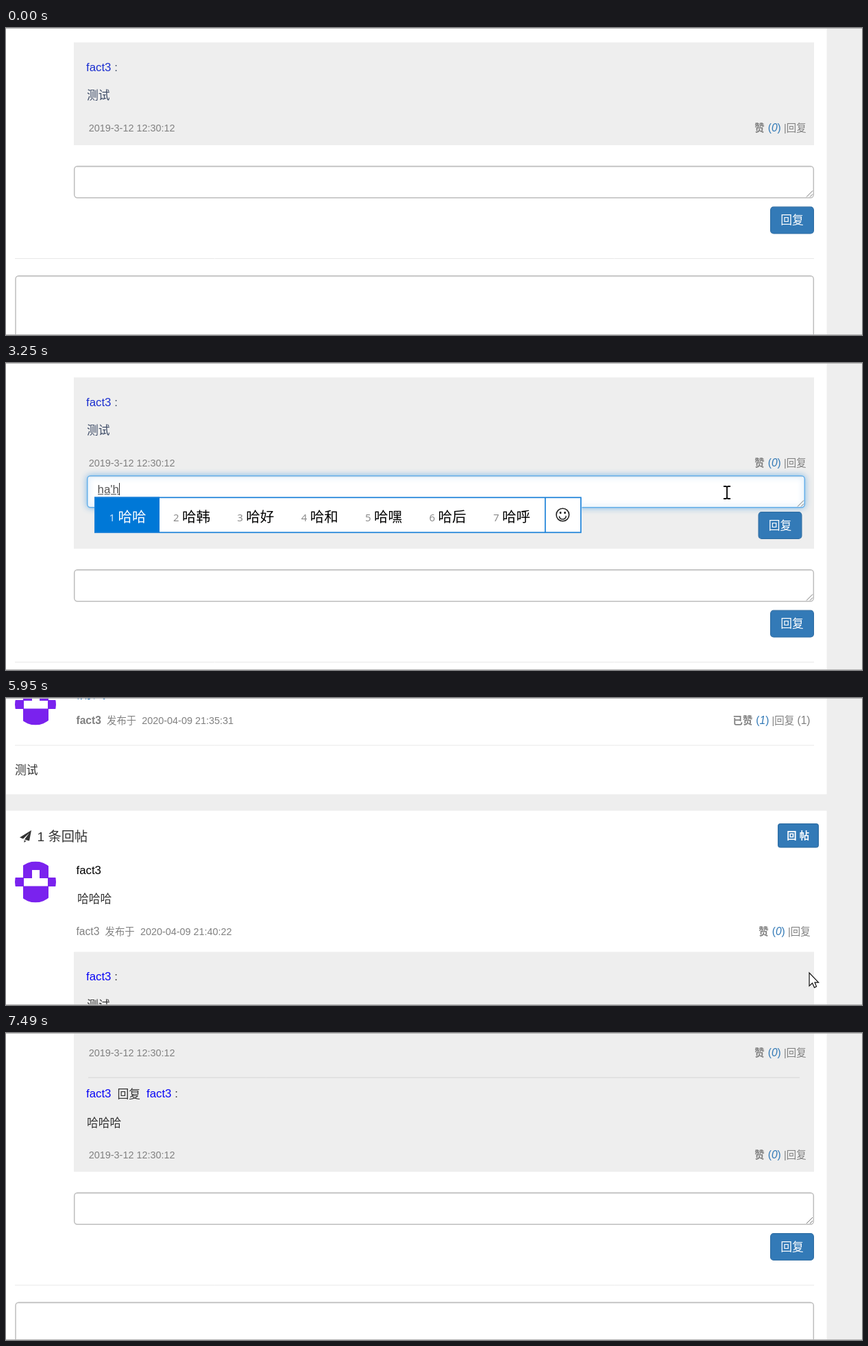
Animation, 1249 px wide and 448 px high, one loop 7870 ms. Source, as an HTML page with a canvas:

```html
<!DOCTYPE html>
<html lang="zh-CN">
<head>
<meta charset="utf-8">
<title>回复演示</title>
<style>
html, body { margin: 0; width: 100%; height: 100%; overflow: hidden; background: #eee; }
canvas { display: block; }
</style>
</head>
<body>
<canvas id="stage" width="1249" height="448"></canvas>
<script>
const c = document.getElementById('stage').getContext('2d');
const LOOP = 7870, RELOAD = 5170, USER = 'fact3';
const SANS = '"Liberation Sans", "Noto Sans CJK SC", "Noto Sans CJK", sans-serif';
const UI = '"Open Sans", "Noto Sans CJK SC", "Noto Sans CJK", sans-serif';
const GREY = '#808080', BLUE = '#337ab7';

// Piecewise linear track: keys are [time, ...values]
function track(t, keys) {
  let i = 1;
  while (i < keys.length - 1 && t > keys[i][0]) i++;
  const a = keys[i - 1], b = keys[i];
  const p = Math.min(1, Math.max(0, (t - a[0]) / (b[0] - a[0])));
  return a.slice(1).map((v, k) => v + (b[k + 1] - v) * p);
}
const within = (t, a, b) => t >= a && t < b;
const swing = p => 0.5 - Math.cos(Math.PI * Math.min(1, Math.max(0, p))) / 2;

const POINTER = [
  [0, 1204, 470], [55, 1204, 455], [110, 1202, 425], [350, 1180, 270], [640, 1150, 160],
  [720, 1148, 152], [1220, 1148, 152], [1500, 1075, 184], [1690, 1052, 189],
  [4380, 1052, 189], [4560, 1132, 239], [4740, 1132, 239], [5110, 1160, 308],
  [5400, 1162, 330], [5950, 1172, 401], [6180, 1186, 421], [6260, 1190, 425],
  [6420, 1197, 460], [6740, 1203, 460], [6800, 1200, 432], [7030, 1167, 371],
  [7300, 1175, 392], [7430, 1196, 432], [7490, 1203, 470], [LOOP, 1203, 470]];
const SCROLL = [[5400, 349], [5550, 270], [5750, 90], [5900, 8], [5950, 0],
  [6770, 0], [7030, 171], [7300, 360], [7460, 467]];
const TYPING = [
  [3020, 'h', '和 好 后 会 还 很 或'],
  [3100, 'ha', '哈 蛤 铪 虾 嗄 呵 嘿'],
  [3250, "ha'h", '哈哈 哈韩 哈好 哈和 哈嘿 哈后 哈呼'],
  [3330, "ha'ha", '哈哈 哈哈哈哈哈 哈哈哈哈 哈哈镜 哈哈大笑 哈哈一笑 哈哈笑着'],
  [3490, "ha'ha'h", '哈哈哈 哈哈 哈韩 哈好 哈和 哈嘿 哈'],
  [3730, '哈哈哈', '']];

const ARROW = new Path2D('M0 0V19L4.5 15 7.5 21.5 10.5 20 8 14H13.5Z');
const HAND = new Path2D('M-2 2Q0-1 2 2V11Q4 8 6 11.5Q8 9 9 12.5Q12 11 12 14V19Q11 23 10 26H-1Q-3 22-8 16Q-8 12-4 14L-2 16Z');
const IBEAM = new Path2D('M-5-9H-1.5L0-8 1.5-9H5M0-8V8M-5 9H-1.5L0 8 1.5 9H5');
const PLANE = new Path2D('M37 193L20 203.5 25 205.5 34 197 27 206.5 34 208.5ZM26.5 207.5V211L29.5 208.5Z');

function rect(x, y, w, h, color) {
  c.fillStyle = color;
  c.fillRect(x, y, w, h);
}
function text(s, x, y, size, color, style = '', family = SANS) {
  c.font = `${style} ${size}px ${family}`;
  c.fillStyle = color;
  c.fillText(s, x, y);
}
function line(x1, y1, x2, y2, color, width = 1) {
  c.strokeStyle = color;
  c.lineWidth = width;
  c.beginPath();
  c.moveTo(x1, y1);
  c.lineTo(x2, y2);
  c.stroke();
}
function round(x, y, w, h, r, fill, stroke, width = 1) {
  c.beginPath();
  c.roundRect(x, y, w, h, r);
  c.fillStyle = fill;
  c.fill();
  c.strokeStyle = stroke;
  c.lineWidth = width;
  c.stroke();
}
function field(x, y, w, h, focus) {
  c.save();
  if (focus) { c.shadowColor = 'rgba(102,175,233,.8)'; c.shadowBlur = 9; }
  round(x + .7, y + .7, w - 1.4, h - 1.4, 4.5, '#fff', focus ? '#66afe9' : '#bdbdbd', 1.5);
  c.restore();
  line(x + 4, y + 2, x + w - 4, y + 2, 'rgba(0,0,0,.07)');
  line(x + w - 11, y + h - 2, x + w - 2, y + h - 11, '#777');
  line(x + w - 6, y + h - 2, x + w - 2, y + h - 6, '#777');
}
function replyButton(x, y, state) {
  if (state === 'focus') round(x - .2, y - .2, 64.6, 40.4, 2, '#7aa9ee', '#7aa9ee', 1);
  const edge = { focus: '#122b40', hover: '#204d74' }[state] || '#2e6da4';
  round(x + .6, y + .6, 62.8, 38.8, 4.5, state ? '#286090' : BLUE, edge, 1.2);
  text('回复', x + 15.2, y + 25.6, 16.8, '#fff');
}
function likes(x, y, n, label = '赞') {
  text(label, x, y, 14.4, GREY, 'bold');
  x += label.length * 14.4 + 5;
  text('(', x, y, 15.6, BLUE);
  text(n, x + 5.2, y, 15.6, BLUE, 'italic');
  text(')', x + 13.9, y, 15.6, BLUE);
  text('|回复', x + 23.3, y, 14.4, GREY);
}
function avatar(cx, cy) {
  c.save();
  c.beginPath();
  c.arc(cx, cy, 30, 0, 7);
  c.clip();
  rect(cx - 18, cy - 30, 37, 60, '#7a22ee');
  rect(cx - 30, cy - 6.5, 60, 13, '#7a22ee');
  rect(cx - 17, cy - 5.5, 35, 11.5, '#fff');
  rect(cx - 5, cy - 17.5, 11, 13, '#fff');
  c.restore();
}
function name(x, y, link, ink) {
  text(USER, x, y, 16.8, link);
  text(':', x + 41.2, y, 16.8, ink);
}

// Everything above the nested replies, in coordinates of the topmost scroll position
function drawThread() {
  rect(0, -400, 1197.5, 540.5, '#fff');
  rect(0, 164.5, 1197.5, 1200, '#fff');
  avatar(43, 9.5);
  text('测试', 103, 0, 21.6, BLUE);
  text(USER, 102.5, 38, 15.6, GREY, 'bold');
  text('发布于', 147, 38, 14.4, GREY);
  text('2020-04-09 21:35:31', 198.3, 38, 14.4, GREY);
  likes(1060.5, 38, '1', '已赞');
  text('(1)', 1154.5, 38, 15.6, GREY);
  line(13, 69, 1179, 69, '#e8e8e8');
  text('测试', 13, 111, 16.8, '#333');

  c.fillStyle = '#333';
  c.fill(PLANE);
  text('1 条回帖', 45.5, 208.5, 19.2, '#333');
  round(1126.6, 183.6, 58.8, 34.3, 3.5, BLUE, '#2e6da4', 1.2);
  text('回 帖', 1139.3, 205.5, 14.4, '#fff', 'bold');
  avatar(43, 268.5);
  text(USER, 102.5, 256.5, 16.8, '#000');
  text('哈哈哈', 104, 298.6, 16.8, '#333');
  text(USER, 102.5, 346, 15.6, GREY);
  text('发布于', 144.5, 346, 14.4, GREY);
  text('2020-04-09 21:40:22', 196, 346, 14.4, GREY);
  likes(1098.3, 346, '0');
}

function drawInput(t, h) {
  c.save();
  c.beginPath();
  c.rect(99, 150, 1080, 7 + h + (h >= 100 ? 2 : 0));
  c.clip();
  field(118, 164, 1048, 47.5, within(t, 1540, 4710));
  replyButton(1097.5, 217, t >= 4710 ? 'focus' : t >= 4480 ? 'hover' : '');
  c.restore();
  if (t < 1540) return;

  const [, typed, words] = TYPING.filter(k => t >= k[0]).pop() || [0, '', ''];
  text(typed, 133.6, 189.5, 16.8, '#555');
  const end = 134 + c.measureText(typed).width;
  if (within(t, 1540, 2070) || within(t, 2620, 4250)) rect(Math.round(end), 175, 1, 18, '#333');
  if (words) {
    c.setLineDash([8, 1.5]);
    line(134, 191.5, end, 191.5, '#555');
    c.setLineDash([]);
    drawCandidates(words.split(' '));
  }
}
function drawCandidates(words) {
  const widths = words.map(w => 52.4 + 20.5 * w.length);
  const split = 132.5 + widths.reduce((a, b) => a + b);
  rect(129, 195.5, split + 54 - 129, 52.5, '#fff');
  rect(129, 195.5, widths[0] + 1.6, 52.5, '#0078d7');
  let x = 150.5;
  words.forEach((w, i) => {
    text(i + 1, x, 231, 15, i ? '#858585' : '#dcecfa', '', UI);
    text(w, x + 13, 231.8, 20.5, i ? '#000' : '#fff');
    x += widths[i];
  });
  c.strokeStyle = '#1a80d8';
  c.lineWidth = 1.7;
  c.strokeRect(129.8, 196.3, split + 52.5 - 129.8, 51);
  line(split + .5, 196, split + .5, 248, '#1a80d8', 1.7);
  const fx = split + 26;
  c.strokeStyle = '#222';
  c.lineWidth = 1.6;
  c.beginPath();
  c.arc(fx, 221.5, 9.3, 0, 7);
  c.moveTo(fx + 5, 223.5);
  c.arc(fx, 223, 5, .1, Math.PI - .1);
  c.stroke();
  rect(fx - 4.5, 217, 2.5, 3, '#222');
  rect(fx + 2, 217, 2.5, 3, '#222');
}

function drawReplies(t, top) {
  const fresh = t >= RELOAD;
  const link = fresh ? '#0a06f5' : '#1a2ed0', ink = fresh ? '#333' : '#3d4b66';
  const h = fresh ? 0 : 100 * swing((t - 800) / 400);
  const bottom = top + (fresh ? 299 : 150 + h);
  rect(99, top, 1080, bottom - top, '#eee');
  name(117, top + 41.5, link, ink);
  text('测试', 118, top + 83.3, 16.8, ink);
  text('2019-3-12 12:30:12', 120.8, top + 130, 14.4, GREY);
  likes(1092.3, top + 130, '0');
  if (within(t, 640, 1250)) line(1138.5, top + 132, 1168, top + 132, GREY);
  if (fresh) {
    line(120, top + 161.5, 1158, top + 161.5, '#d4d4d4');
    text(USER, 117, top + 190.5, 16.8, link);
    text('回复', 162.5, top + 191, 16.8, ink);
    name(205, top + 190.5, link, ink);
    text('哈哈哈', 118, top + 233, 16.8, ink);
    text('2019-3-12 12:30:12', 120.8, top + 279.5, 14.4, GREY);
    likes(1092.3, top + 279.5, '0');
  }
  field(99, bottom + 30, 1080, 47.5);
  replyButton(1115, bottom + 89.6);
  line(13, bottom + 165.5, 1179, bottom + 165.5, '#e8e8e8');
  field(13.3, bottom + 190, 1165.7, 240);
  if (h > 0) drawInput(t, h);
}

function drawPointer(t) {
  const [x, y] = track(t, POINTER);
  c.save();
  c.translate(x, y);
  if (within(t, 1300, 4450)) {
    c.strokeStyle = '#000';
    c.lineWidth = 1.8;
    c.stroke(IBEAM);
  } else {
    const shape = within(t, 640, 1300) || within(t, 4450, 4800) ? HAND : ARROW;
    c.fillStyle = '#fff';
    c.fill(shape);
    c.strokeStyle = '#111';
    c.lineWidth = 1.2;
    c.stroke(shape);
  }
  c.restore();
}

function draw(t) {
  const [scroll] = track(t, SCROLL);
  rect(0, 0, 1249, 448, '#eee');
  c.save();
  c.translate(0, -scroll);
  drawThread();
  c.restore();
  drawReplies(t, 370.5 - Math.round(scroll) - (t < RELOAD ? .5 : 0));
  if (within(t, 660, 1320)) {
    round(-8, 425.5, 121, 40, 4, '#fff', '#ddd');
    c.textAlign = 'right';
    text('etail/10#reply-9', 103, 445.5, 14, '#666', '', UI);
    c.textAlign = 'left';
  }
  drawPointer(t);
  rect(0, 0, 1249, 1, '#b4b4b4');
  rect(0, 447, 1249, 1, '#b4b4b4');
}

const start = performance.now();
function tick() {
  draw((performance.now() - start) % LOOP);
  requestAnimationFrame(tick);
}
tick();
</script>
</body>
</html>
```
